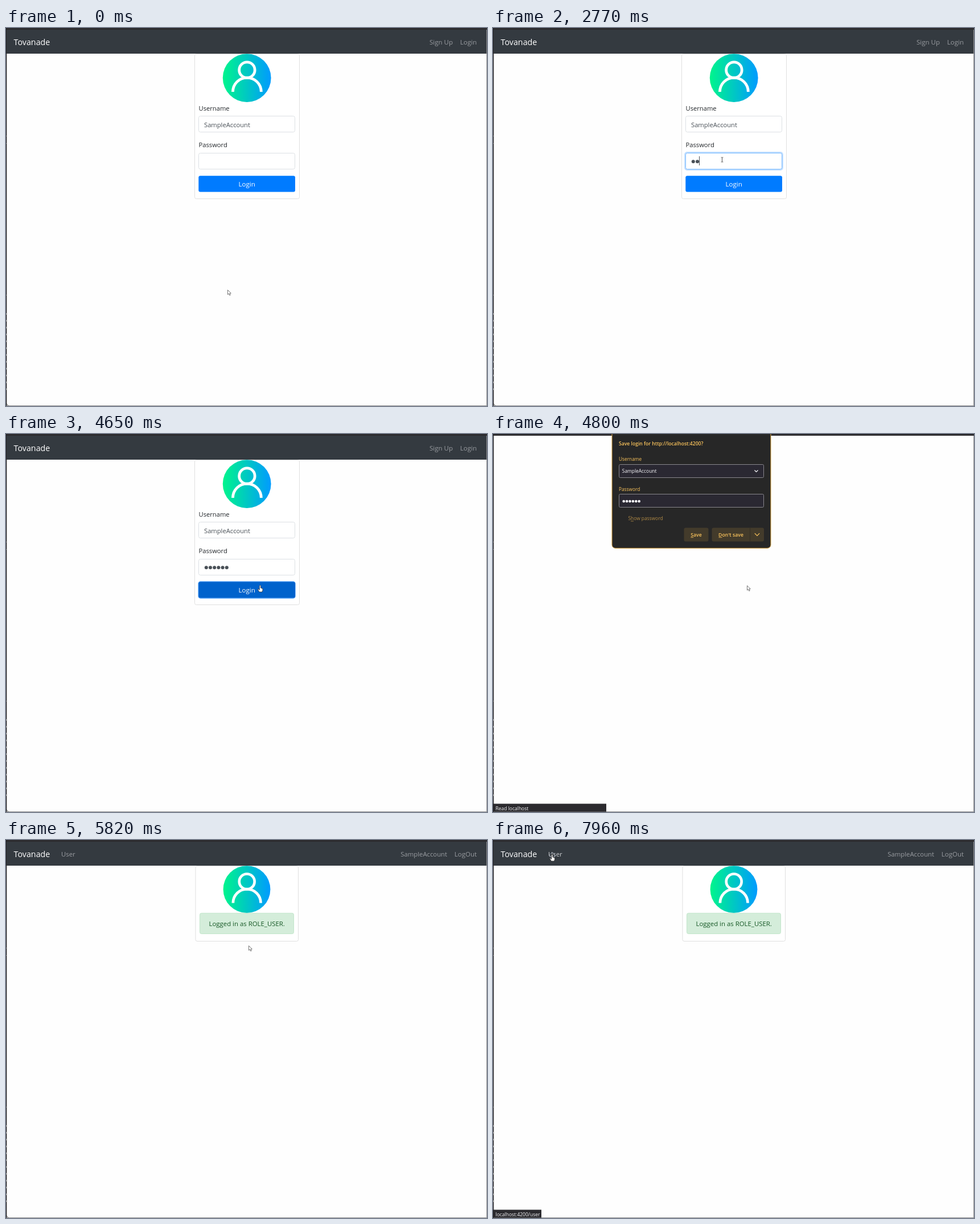
These frames come from a looping animation (845x663 px, 8 s). An HTML page with a canvas:

```html
<!DOCTYPE html>
<html lang="en">
<head>
<meta charset="utf-8">
<title>Login demo</title>
<style>
html, body { margin: 0; width: 100%; height: 100%; overflow: hidden; background: #fefefe; }
canvas { display: block; }
</style>
</head>
<body>
<canvas id="stage" width="845" height="663"></canvas>
<script>
const ctx = document.getElementById('stage').getContext('2d');
const LOOP = 8000;
const FONT = '"Open Sans", "Noto Sans", sans-serif';
const BRAND = 'Tovanade';
const USER = 'SampleAccount';
const GOLD = '#fbc45c';
const MUTED = '#999ca0';

// Pointer moves: start time, number of steps, step length, end x, end y
const START = [389.5, 459.5];
const MOVES = [
  [150, 6, 129, 402.5, 231],
  [3930, 4, 140, 446.5, 266],
  [5100, 5, 140, 426.5, 185.5],
  [6090, 3, 120, 341, 210],
  [6630, 3, 135, 177.5, 44.5],
  [7030, 2, 130, 118, 16],
  [7300, 2, 130, 104, 26]
];
const within = (t, a, b) => t >= a && t < b;
const inside = (p, x, y, w, h) => within(p[0], x, x + w) && within(p[1], y, y + h);

function pointerAt(t) {
  let [x, y] = START;
  for (const [start, steps, tick, endX, endY] of MOVES) {
    if (t < start) break;
    const k = Math.min(1, (Math.floor((t - start) / tick) + 1) / steps);
    const f = k * k * (3 - 2 * k);
    x += (endX - x) * f;
    y += (endY - y) * f;
  }
  return [x, y];
}

function text(str, x, y, size, color, weight = 400, align = 'left') {
  ctx.font = `${weight} ${size}px ${FONT}`;
  ctx.textAlign = align;
  ctx.fillStyle = color;
  ctx.fillText(str, x, y);
}

function rect(x, y, w, h, color) {
  ctx.fillStyle = color;
  ctx.fillRect(x, y, w, h);
}

function box(x, y, w, h, r, fill, stroke) {
  ctx.beginPath();
  ctx.roundRect(x, y, w, h, r);
  if (fill) { ctx.fillStyle = fill; ctx.fill(); }
  if (stroke) { ctx.strokeStyle = stroke; ctx.lineWidth = 1; ctx.stroke(); }
}

function line(points, color, width) {
  ctx.beginPath();
  points.forEach(([x, y]) => ctx.lineTo(x, y));
  ctx.strokeStyle = color;
  ctx.lineWidth = width;
  ctx.stroke();
}

function dots(count, x, y, pitch, r, color) {
  ctx.fillStyle = color;
  for (let i = 0; i < count; i++) {
    ctx.beginPath();
    ctx.arc(x + i * pitch, y, r, 0, 7);
    ctx.fill();
  }
}

function glow(x, y, w, h, alpha) {
  box(x - 2.4, y - 2.4, w + 4.8, h + 4.8, 5, `rgba(0,123,255,${alpha})`);
}

function avatar(cx, cy, r) {
  ctx.save();
  ctx.translate(cx, cy);
  ctx.scale(r / 42.5, r / 42.5);
  const fill = ctx.createLinearGradient(-42.5, 0, 42.5, 0);
  fill.addColorStop(0, '#00f58c');
  fill.addColorStop(0.5, '#00c8c3');
  fill.addColorStop(1, '#009bff');
  dots(1, 0, 0, 0, 42.5, fill);
  ctx.strokeStyle = '#fff';
  ctx.lineWidth = 4.8;
  ctx.beginPath();
  ctx.arc(0.2, -14, 13.8, 0, 7);
  ctx.stroke();
  ctx.beginPath();
  ctx.arc(0.2, 24.5, 25, Math.PI, 0);
  ctx.stroke();
  ctx.restore();
}

function windowFrame() {
  rect(0, 0, 845, 663, '#fefefe');
  rect(0, 0, 845, 3, '#2c2b2e');
  rect(0, 0, 1.3, 663, '#1c1b1e');
  rect(844, 3, 1, 660, '#8c8c8e');
  rect(1, 662, 844, 1, '#8c8c8e');
  for (let y = 500; y < 636; y += 12) rect(0, y, 1, 3, '#8a8a8a');
  [189, 202, 468].forEach(y => rect(0, y, 1, 1, '#777'));
  line([[1, 659], [4, 662.5]], '#555', 1);
}

function navbar(loggedIn, linkHover) {
  rect(1, 3, 843, 42, '#343a40');
  text(BRAND, 13.5, 30, 14.3, '#fff');
  if (loggedIn) {
    text('User', 97, 29, 11.4, linkHover ? '#ccced0' : MUTED);
    text(USER, 775, 29, 11.3, MUTED, 400, 'right');
    text('LogOut', 827, 29, 11.5, MUTED, 400, 'right');
  } else {
    text('Sign Up', 744, 29, 11.5, MUTED);
    text('Login', 827, 29, 11.5, MUTED, 400, 'right');
  }
}

function card(x, w, bottom) {
  ctx.save();
  ctx.beginPath();
  ctx.rect(x - 2, 45, w + 4, bottom);
  ctx.clip();
  box(x, 45.5, w, bottom - 45.5, 3, '#fff', '#dfdfdf');
  ctx.restore();
}

function loginPage(t, pointer) {
  navbar(false);
  card(331.5, 184, 299.5);
  avatar(423.2, 87.6, 42.4);
  text('Username', 338.5, 144.5, 11.2, '#212529');
  box(338.5, 154.5, 169, 28, 3, '#fff', '#dce0e4');
  text(USER, 348, 173.5, 11.2, '#495057');
  text('Password', 338.5, 209, 11.2, '#212529');

  const focused = within(t, 921, 4500);
  if (focused) glow(338.5, 219.5, 169, 28, t < 1050 ? 0.12 : 0.25);
  const border = focused ? '#80bdff' : within(t, 4500, 4650) ? '#bcd8f2' : '#dce0e4';
  box(338.5, 219.5, 169, 28, 3, '#fff', border);

  const typed = t < 2620 ? 0 : Math.min(6, 1 + Math.floor((t - 2620) / 144));
  dots(typed, 351.8, 234.2, 7.2, 3, '#495057');
  const caretOn = within(t, 921, 1450) || within(t, 2040, 2470) ||
    within(t, 2620, 3650) || within(t, 4200, 4500);
  if (caretOn) rect(348 + Math.round(typed * 7.2), 225, 1, 16, '#495057');

  const pressed = t >= 4500;
  if (pressed) glow(339.5, 260.5, 167, 26, t < 4650 ? 0.35 : 0.5);
  const hover = inside(pointer, 338, 259, 170, 29);
  box(338.3, 259.3, 169.7, 28.2, 3, pressed ? '#0062cc' : hover ? '#0069d9' : '#007bff');
  text('Login', 423.2, 278, 11.5, '#fff', 400, 'center');
}

function homePage(linkHover) {
  navbar(true, linkHover);
  card(333, 180.5, 177.5);
  avatar(423, 86.6, 41.4);
  box(340.5, 128.3, 165, 36.2, 3, '#d4edda', '#c3e6cb');
  text('Logged in as ROLE_USER.', 356.5, 151, 11.4, '#155724');
}

function chevron(x, y, size, color) {
  line([[x - size, y - size / 2], [x, y + size / 2], [x + size, y - size / 2]], color, 1.2);
}

function saveDialog(hover) {
  box(209, -8, 279, 208.3, 6, '#272727', '#d9a03a');
  text('Save login for http://localhost:4200?', 221, 20, 8.6, GOLD, 600);
  text('Username', 221, 47, 8.3, GOLD);
  box(221.5, 53.5, 254, 23, 2, '#2a2832', '#88868c');
  text(USER, 226.8, 68, 8.4, '#fbfbfe');
  chevron(462.5, 65, 3, '#fbfbfe');
  text('Password', 221, 99.5, 8.3, GOLD);
  box(221.5, 105.5, 254, 23, 2, '#2a2832', '#88868c');
  dots(6, 229.7, 118, 5.4, 2.3, '#fbfbfe');
  text('Show password', 237.5, 151.3, 8.4, '#b18a45');
  rect(242, 152.5, 5, 0.8, '#b18a45');

  box(335.5, 164.5, 43, 24, 3, '#433b2b');
  text('Save', 357, 179.7, 8.7, GOLD, 600, 'center');
  rect(347.3, 181, 5, 0.8, GOLD);
  box(384.5, 164.5, 91.5, 24, 3, '#433b2b');
  if (hover) box(384.5, 164.5, 66.5, 24, [3, 0, 0, 3], '#6b5934');
  rect(451, 164.5, 1, 24, '#332e25');
  text("Don't save", 418, 179.7, 8.7, GOLD, 600, 'center');
  rect(396.5, 181, 6, 0.8, GOLD);
  chevron(464, 176.3, 4.2, GOLD);
}

function statusBar(label, width, alpha = 1) {
  ctx.globalAlpha = alpha;
  rect(1, 648.5, width, 14, '#2b2a2e');
  text(label, 4.5, 660, 8.5, '#f4f4f6');
  ctx.globalAlpha = 1;
}

function shape(points, fill, stroke) {
  ctx.beginPath();
  points.forEach(([x, y]) => ctx.lineTo(x, y));
  ctx.closePath();
  ctx.fillStyle = fill;
  ctx.fill();
  ctx.strokeStyle = stroke;
  ctx.lineWidth = 0.8;
  ctx.stroke();
}

function drawPointer([x, y], kind) {
  ctx.save();
  ctx.translate(x, y);
  ctx.lineJoin = 'round';
  if (kind === 'beam') {
    rect(-0.5, -4, 1, 8, '#555');
    rect(-2, -4.5, 4, 1, '#777');
    rect(-2, 3.5, 4, 1, '#777');
  } else if (kind === 'hand') {
    shape([[-1.2, 0], [0, -0.8], [1, 0], [1, 4], [4.3, 5], [4.6, 8], [3.4, 11],
      [-1.5, 11], [-4.2, 6.8], [-3.4, 5.8], [-1.2, 7.5]], '#fff', '#333');
  } else {
    shape([[0, 0], [0, 8], [1.9, 6.4], [3.3, 9.4], [4.7, 8.8], [3.4, 5.9], [5.8, 5.7]], '#fff', '#555');
  }
  ctx.restore();
}

function clickRing([x, y]) {
  ctx.beginPath();
  ctx.arc(x + 0.2, y + 1, 4.6, 0, 7);
  ctx.strokeStyle = 'rgba(170,180,195,.75)';
  ctx.lineWidth = 0.9;
  ctx.stroke();
}

function draw(t) {
  const pointer = pointerAt(t);
  const onLogin = t < 4800;
  const onHome = t >= 4950;
  const overLink = onHome && inside(pointer, 96, 17, 26, 20);
  let kind = 'arrow';
  if (onLogin && inside(pointer, 338, 219, 170, 29)) kind = 'beam';
  if (overLink || onLogin && inside(pointer, 338, 259, 170, 29)) kind = 'hand';

  windowFrame();
  if (onLogin) loginPage(t, pointer);
  if (onHome) homePage(overLink);
  if (within(t, 4800, 5820)) saveDialog(inside(pointer, 384, 164, 67, 25));
  if (within(t, 4800, 5100)) statusBar('Read localhost', 198);
  if (t >= 7560) statusBar('localhost:4200/user', 84, t < 7680 ? 0.5 : 1);
  if (within(t, 921, 1050) || within(t, 4500, 4650) || t >= 7960) clickRing(pointer);
  drawPointer(pointer, kind);
}

function tick(now) {
  draw(now % LOOP);
  requestAnimationFrame(tick);
}
draw(0);
requestAnimationFrame(tick);
</script>
</body>
</html>
```
